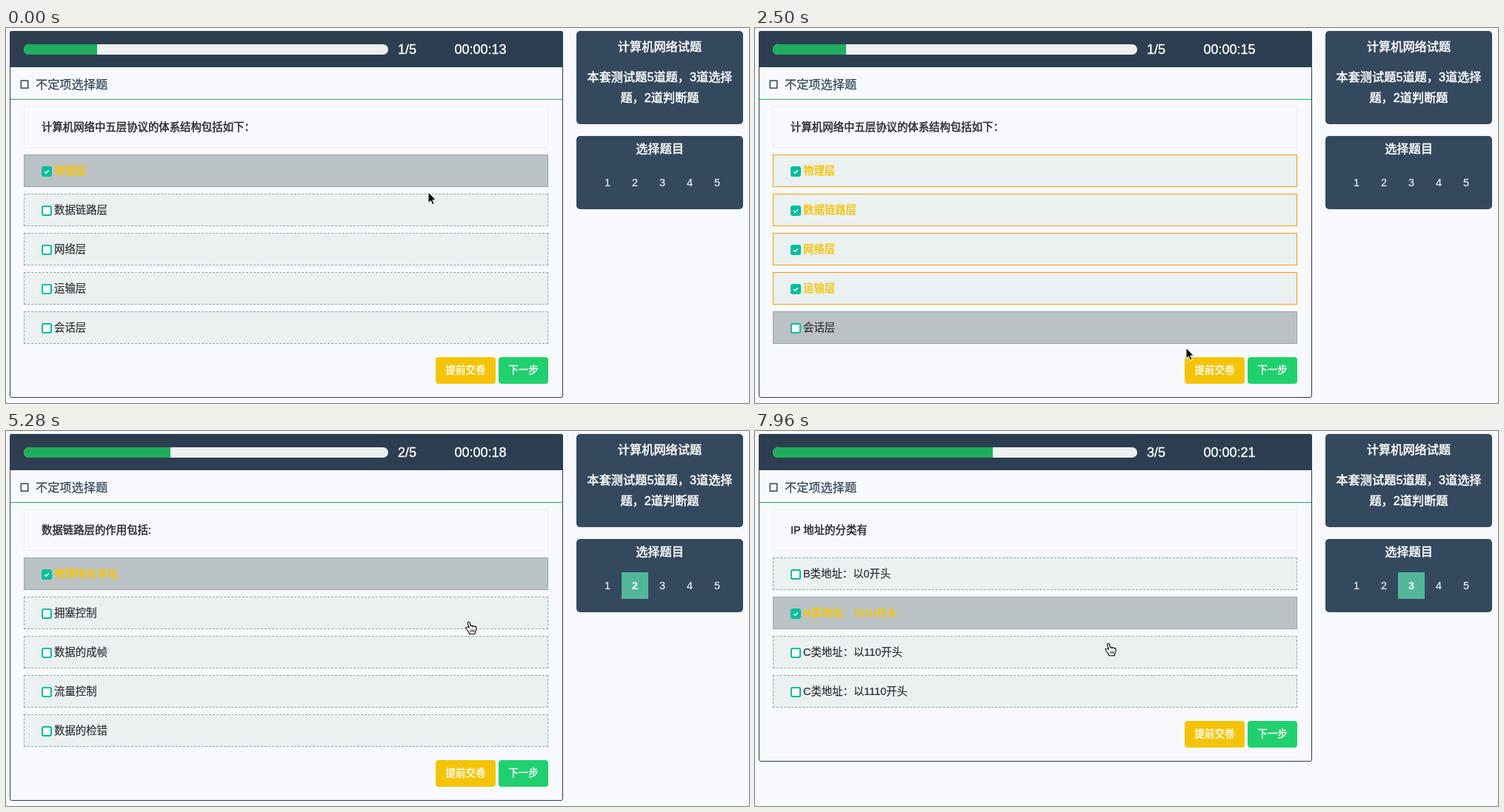
Animation of 1003 by 507 pixels, one loop 8 s. Source, as an HTML page:

```html
<!DOCTYPE html>
<html lang="zh-CN">
<head>
<meta charset="utf-8">
<title>测试</title>
<style>
html, body { margin: 0; width: 100%; height: 100%; overflow: hidden; background: #f8f9fc; }
body { position: relative; font-family: "Liberation Sans", "Noto Sans CJK SC", "Noto Sans CJK", sans-serif; color: #2c2f33; }
div, svg { position: absolute; box-sizing: border-box; white-space: nowrap; }
.panel { left: 5px; top: 4px; width: 747px; border: 1px solid #2c3e50; border-radius: 3px; }
.head { left: 5px; top: 4px; width: 747px; height: 49px; background: #2c3e50; border-radius: 3px 3px 0 0; }
.track { left: 24px; top: 22px; width: 492px; height: 14px; border-radius: 7px; background: #ecf0f1; overflow: hidden; }
.fill { left: 0; top: 0; height: 14px; background: #20ae5e; }
.stat { top: 17px; line-height: 24px; font-size: 18px; color: #fff; -webkit-text-stroke: .4px; }
.title { left: 6px; top: 53px; width: 745px; height: 44px; padding-left: 34px; line-height: 46px; font-size: 16.2px; color: #34495e; border-bottom: 1px solid #20ae5e; -webkit-text-stroke: .25px; }
.content { left: 0; top: 0; width: 752px; height: 500px; }
.ask { left: 24px; top: 106px; width: 708px; height: 56px; padding-left: 23px; border: 1px solid #eceeef; line-height: 54px; font-size: 14.4px; -webkit-text-stroke: .5px; }
.row { left: 24px; width: 708px; height: 44px; padding-left: 40px; line-height: 42px; font-size: 14.4px; background: #ebf0f1; border: 1px dashed #95a5a6; -webkit-text-stroke: .2px; }
.row.on { color: #f3c50c; font-weight: 700; border: 1px solid #f39c12; -webkit-text-stroke: 0; }
.row.over { background: #bbc2c6; border: 1px solid #95a5a6; }
.busy { opacity: .43; }
.busy .row { background: none; }
.busy .ask { border-color: transparent; }
.box { left: 23px; top: 15px; width: 14px; height: 14px; border: 2px solid #00bd9c; border-radius: 3px; background: #fff; }
.on .box { background: #00bd9c; }
.box svg { left: -2px; top: -2px; display: none; }
.on svg { display: block; }
.btn { height: 36px; border-radius: 4px; line-height: 35px; text-align: center; font-size: 13.5px; color: #fff; -webkit-text-stroke: .4px; }
.card { left: 770px; width: 225px; border-radius: 5px; background: #34495e; color: #fff; text-align: center; font-size: 16.2px; -webkit-text-stroke: .5px; }
.card div { left: 0; width: 100%; line-height: 28px; }
.card .num { top: 45px; width: 36px; height: 36px; line-height: 36px; font-size: 14.4px; color: #eef1f3; -webkit-text-stroke: .2px; }
.card .num.cur { font-weight: 700; }
.cursor { left: 0; top: 0; }
</style>
</head>
<body>
<div class="panel" id="panel"></div>
<div class="head"></div>
<div class="track"><div class="fill" id="fill"></div></div>
<div class="stat" id="step" style="left:529px"></div>
<div class="stat" id="clock" style="left:605.5px"></div>
<div class="title">不定项选择题</div>
<svg style="left:19px;top:70px" width="13" height="13"><rect x="1.25" y="1.25" width="9.5" height="10" fill="none" stroke="#34495e" stroke-width="1.5"/></svg>

<div class="content" id="content">
  <div class="ask" id="ask"></div>
  <div class="btn" id="submit" style="left:580px;width:81px;background:#f4c404">提前交卷</div>
  <div class="btn" id="next" style="left:665px;width:67px;background:#20d06e">下一步</div>
</div>

<div class="card" style="top:4px;height:126px">
  <div style="top:7px">计算机网络试题</div>
  <div style="top:48px">本套测试题5道题，3道选择<br>题，2道判断题</div>
</div>
<div class="card" id="picker" style="top:146px;height:99px">
  <div style="top:3px">选择题目</div>
</div>

<svg class="cursor" id="arrow" width="14" height="20" viewBox="-1 -1 14 20">
  <path d="M0 0V14.6L3.4 11.5 5.6 16.8 8.1 15.8 5.9 10.6H10.4Z" fill="#000" stroke="#fff"/>
</svg>
<svg class="cursor" id="hand" width="17" height="19">
  <path d="M5 .8C3.6 .8 3.4 2.3 3.8 3.6L5.6 9.2C4.4 8 2.2 7.2 1.2 8.2 .5 9 1.3 9.9 2.2 10.8 3.6 12.2 4 14 5.4 15.2L5.8 17.2H13.2L13.6 15C15 13 15.4 11 15 8.2 14.7 6.6 12.9 6.4 12.5 7.6 12.3 6 10.2 5.6 9.8 7 9.4 5.6 8 5.5 7.5 6.2L6.4 2C6.1 1 5.6 .8 5 .8Z" fill="#fff" stroke="#000" stroke-width="1.1"/>
  <path d="M7.9 11v3.6M10 11v3.6M12.1 11v3.6" stroke="#000" stroke-width=".9"/>
</svg>

<script>
const LOOP = 8000, TICK = 147.4;
const TOP = 171, PITCH = 53, ROW = 44;
const $ = id => document.getElementById(id);

// Times count screen refreshes of TICK ms; ticked[i] is when row i gets its mark.
const pages = [
  { ask: '计算机网络中五层协议的体系结构包括如下：', rows: ['物理层', '数据链路层', '网络层', '运输层', '会话层'], ticked: [0, 3, 5, 7] },
  { ask: '数据链路层的作用包括:', rows: ['物理地址寻址', '拥塞控制', '数据的成帧', '流量控制', '数据的检错'], ticked: [33] },
  { ask: 'IP 地址的分类有', rows: ['B类地址：以0开头', 'B类地址：以10开头', 'C类地址：以110开头', 'C类地址：以1110开头'], ticked: [, 53] }
];
const clicks = [19, 40];
const stops = [
  [-1, 572, 200], [0, 570, 222], [3, 560, 246], [5, 540, 295], [8, 514, 346], [11, 495, 305],
  [12, 482, 365], [15, 484, 402], [19, 680, 463], [23, 680, 463], [24, 620, 252], [31, 605.5, 218],
  [34, 598, 192], [38, 701, 455], [41, 701, 455], [44, 535, 207], [46, 530, 204], [49, 502, 250],
  [53, 500, 250], [54, 476, 287]
];

const add = (parent, cls, top, left, html) => {
  const el = document.createElement('div');
  el.className = cls;
  el.innerHTML = html;
  if (top) el.style.top = top + 'px';
  if (left) el.style.left = left + 'px';
  return parent.appendChild(el);
};
const option = '<div class="box"><svg width="14" height="14"><path d="M4 7.2L6.1 9.3 10 5.2" fill="none" stroke="#fff" stroke-width="1.4"/></svg></div><span></span>';
const five = [...Array(5).keys()];
const rows = five.map(i => add($('content'), 'row', TOP + PITCH * i, 0, option));
const nums = five.map(i => add($('picker'), 'num', 0, 24 + 37 * i, i + 1));

const easeOut = u => 1 - (1 - Math.min(1, u)) ** 2;

function pointer(k) {
  const i = Math.max(1, stops.findIndex(s => s[0] >= k));
  const [a, ax, ay] = stops[i - 1], [b, bx, by] = stops[i];
  const u = (k - a) / (b - a);
  return [ax + (bx - ax) * u, ay + (by - ay) * u];
}

function rowAt(y, count) {
  const i = Math.floor((y - TOP) / PITCH);
  return i < count && y - TOP - i * PITCH < ROW ? i : -1;
}

function draw(k) {
  const step = clicks.filter(c => k >= c).length;
  const page = clicks.filter(c => k >= c + 2).length;
  const { ask, rows: labels, ticked } = pages[page];
  const age = step ? k - clicks[step - 1] : Infinity;
  const since = age * TICK + 195;

  $('fill').style.width = 20.1 * (step + easeOut(since / 600) ** (step ? 1 : 0)) + '%';
  if (!step) $('fill').style.width = '20.1%';
  $('step').textContent = step + 1 + '/5';
  $('clock').textContent = '00:00:' + (13 + Math.floor(k * .151));

  const mix = easeOut(since / 450);
  nums.forEach((el, i) => {
    const glow = !i ? 0 : i === step ? mix : i === step - 1 ? 1 - mix : 0;
    el.style.background = `rgba(83,182,155,${glow})`;
    el.classList.toggle('cur', glow > .9);
  });

  // Hover styling trails the pointer by one refresh.
  const hover = age < 5 ? -1 : rowAt(pointer(k - 1)[1], labels.length);
  $('content').classList.toggle('busy', age < 4);
  $('ask').textContent = ask;
  rows.forEach((el, i) => {
    el.style.display = i < labels.length ? '' : 'none';
    el.lastChild.textContent = labels[i] || '';
    el.classList.toggle('on', k >= ticked[i]);
    el.classList.toggle('over', i === hover);
  });
  const end = TOP + PITCH * labels.length;
  $('submit').style.top = $('next').style.top = end + 9 + 'px';
  $('panel').style.height = end + 60 + 'px';

  const [x, y] = pointer(k);
  const link = rowAt(y, labels.length) >= 0 || (y >= end + 9 && x >= 580);
  $('hand').style.display = link ? '' : 'none';
  $('arrow').style.display = link ? 'none' : '';
  $('hand').style.transform = `translate(${x - 4}px,${y - .5}px)`;
  $('arrow').style.transform = `translate(${x - 1}px,${y - 1}px)`;
}

let last = -1;
function loop(now) {
  const k = Math.floor(now % LOOP / TICK + .16);
  if (k !== last) draw(last = k);
  requestAnimationFrame(loop);
}
loop(0);
</script>
</body>
</html>
```
